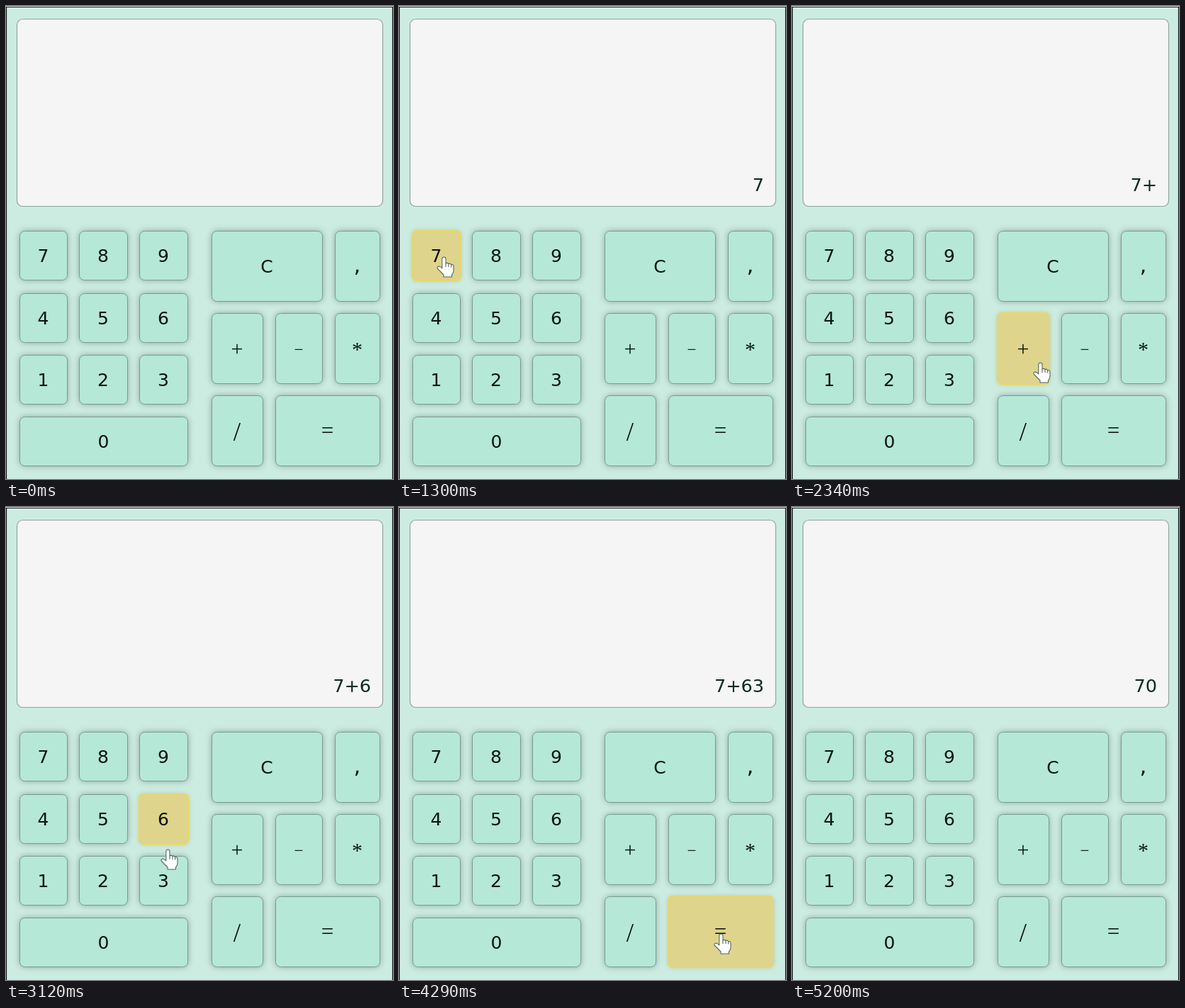
Write an HTML page that moves like this. It is 546 by 667 pixels and loops after 5330 ms.

```html
<!DOCTYPE html>
<html lang="en">
<head>
<meta charset="utf-8">
<title>Calculator</title>
<style>
  html, body { margin: 0; width: 100%; height: 100%; overflow: hidden; background: #cdece1; }
  svg { display: block; width: 546px; height: 667px; }
  text { font: 25px "DejaVu Sans", sans-serif; fill: #0b1512; text-anchor: middle; }
  .op { font-family: "Liberation Serif", serif; }
  .key { fill: #b5e8d6; stroke: #789c90; filter: drop-shadow(0 0 4px rgba(50, 75, 66, .42)); }
  .key.hover { fill: #dfd48b; stroke: #eedb45; filter: drop-shadow(0 0 3px rgba(150, 150, 90, .35)); }
  #out { font-size: 25.5px; fill: #0b2b21; text-anchor: end; }
  .cursor { fill: #fff; stroke: #566460; stroke-width: 1.1; stroke-linejoin: round; }
</style>
</head>
<body>
<svg viewBox="0 0 546 667">
  <rect width="546" height="667" fill="#cdece1"/>
  <path d="M0 .5H546" stroke="#e8f3ee"/>
  <path d="M.5 667V1.5H545.5V667" fill="none" stroke="#101513" stroke-width="1.2"/>
  <rect x="15.5" y="18.5" width="516" height="264" rx="8" fill="#f5f5f5" stroke="#91a39c" stroke-width="1.2"/>
  <text id="out" x="515" y="261"></text>
  <g id="keys"></g>
  <g id="arrow" class="cursor">
    <path d="M0 0V20L4.6 16L8 24.5L11.6 23L8.2 15H14.5Z"/>
  </g>
  <g id="hand" class="cursor">
    <path d="M-2.2 2.5Q-2 0 .5 0T3 2.5V9Q5.2 7.6 7 9.5Q9.2 8.4 10.6 10.6Q14 10 14 13.5V19Q14 22.5 11.5 25V28H0V25Q-4 21 -8.5 16.5Q-10 13.6 -7 13Q-4.5 13 -2.2 16Z"/>
    <path d="M3 9V14M7 9.5V14M10.6 10.6V14.5" fill="none"/>
  </g>
</svg>
<script>
const TICK = 130, LOOP = 5330;
const NS = "http://www.w3.org/2000/svg";
const $ = id => document.getElementById(id);
const keys = {};

function add(tag, attrs, parent) {
  const el = document.createElementNS(NS, tag);
  for (const name in attrs) el.setAttribute(name, attrs[name]);
  return parent.appendChild(el);
}

function addKey(label, x, y, w, h, style = {}) {
  const rect = add("rect", { class: "key", rx: 7 }, $("keys"));
  const { glyph = label, ...attrs } = style;
  add("text", { x: x + w / 2, y: y + h / 2 + 9.5, ...attrs }, $("keys")).textContent = glyph;
  keys[label] = { rect, box: [x, y, w, h] };
}

function setHover(label) {
  for (const name in keys) {
    const { rect, box: [x, y, w, h] } = keys[name];
    const on = name === label, grow = on ? 1.2 : 0;
    rect.classList.toggle("hover", on);
    rect.setAttribute("x", x + .5 - grow);
    rect.setAttribute("y", y + .5 - grow);
    rect.setAttribute("width", w + 2 * grow);
    rect.setAttribute("height", h + 2 * grow);
  }
}

const cols = [19, 103, 188], rows = [317, 405, 492];
["789", "456", "123"].forEach((row, r) =>
  [...row].forEach((d, c) => addKey(d, cols[c], rows[r], c ? 68 : 67, 69)));
addKey("0", 19, 579, 237, 69);

const op = (size, y, extra) => ({ class: "op", style: `font-size:${size}px`, y, ...extra });
addKey("C", 290, 317, 156, 99, { y: 375.5 });
addKey(",", 464, 317, 63, 99, { y: 375, style: "font-size:31px" });
addKey("+", 290, 433, 72, 99, op(30, 493));
addKey("-", 380, 433, 66, 99, op(23, 491.5, { glyph: "\u2212" }));
addKey("*", 464, 433, 63, 99, op(30, 494));
addKey("/", 290, 549, 72, 99, op(37, 613));
addKey("=", 380, 549, 147, 99, op(31, 608.5));

// time, pointer x, pointer y, pointer kind, hovered key, display
const steps = [
  [0, 0, 0, "", "", ""],
  [260, 500, 610, "hand", "=", ""],
  [390, 388, 522, "hand", "-", ""],
  [520, 246, 444, "hand", "6", ""],
  [650, 103, 381, "arrow", "8", ""],
  [780, 63, 354, "hand", "7", ""],
  [1170, 63, 354, "hand", "7", "7"],
  [1560, 92, 372, "arrow", "7", "7"],
  [1690, 160, 408, "hand", "5", "7"],
  [1820, 236, 448, "hand", "6", "7"],
  [1950, 310, 485, "hand", "+", "7"],
  [2080, 350, 503, "hand", "+", "7"],
  [2340, 350, 503, "hand", "+", "7+"],
  [2600, 284, 474, "arrow", "+", "7+"],
  [2730, 226, 448, "hand", "6", "7+"],
  [2990, 226, 448, "hand", "6", "7+6"],
  [3120, 228, 483, "hand", "6", "7+6"],
  [3250, 228, 520, "hand", "3", "7+6"],
  [3380, 228, 522, "hand", "3", "7+63"],
  [3640, 272, 544, "arrow", "3", "7+63"],
  [3770, 344, 574, "hand", "/", "7+63"],
  [3900, 418, 594, "hand", "=", "7+63"],
  [4030, 454, 602, "hand", "=", "7+63"],
  [4420, 454, 602, "hand", "=", "70"],
  [4550, 490, 622, "hand", "=", "70"],
  [4680, 532, 646, "arrow", "=", "70"],
  [4810, 0, 0, "", "", "70"]
];

let shown;
function draw() {
  const t = Math.floor(performance.now() % LOOP / TICK) * TICK;
  const step = steps.findLast(s => s[0] <= t);
  if (step !== shown) {
    shown = step;
    const [, x, y, kind, hover, value] = step;
    for (const id of ["arrow", "hand"]) {
      $(id).setAttribute("display", id === kind ? "inline" : "none");
      $(id).setAttribute("transform", `translate(${x} ${y})`);
    }
    setHover(hover);
    $("out").textContent = value;
  }
  requestAnimationFrame(draw);
}
draw();
</script>
</body>
</html>
```
